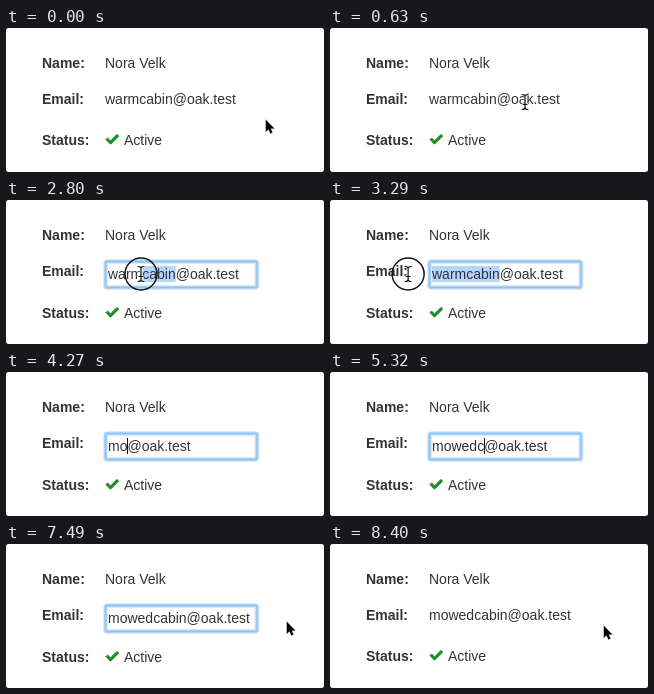
Animation, 318 px wide and 144 px high, one loop 8470 ms. Source, as an HTML page:

```html
<!DOCTYPE html>
<html lang="en">
<head>
<meta charset="utf-8">
<title>Inline edit</title>
<style>
  html, body { margin: 0; width: 100%; height: 100%; overflow: hidden; background: #333; }
  svg { display: block; background: #fff; border-radius: 3px;
        font: 14px "Liberation Sans", Arial, sans-serif; fill: #333; }
  .label { font-weight: bold; }
  .ring { fill: none; }
  .line { fill: none; stroke-linecap: round; }
</style>
</head>
<body>
<svg width="318" height="144" viewBox="0 0 318 144">
  <text class="label" x="36" y="40">Name:</text>
  <text x="99" y="40">Nora Velk</text>
  <text class="label" x="36" y="76">Email:</text>

  <g id="field">
    <rect x="99.5" y="61.5" width="151.5" height="26" rx="1.5" fill="#fff"/>
    <g class="ring">
      <rect x="99.5" y="61.5" width="151.5" height="26" rx="2" stroke="#d8eafc" stroke-width="5"/>
      <rect x="99.5" y="61.5" width="151.5" height="26" rx="1.5" stroke="#a9d2f7" stroke-width="3"/>
      <rect x="99.5" y="61.5" width="151.5" height="26" rx="1" stroke="#92c3ee"/>
    </g>
    <rect id="selection" y="66" height="16" fill="#b4d5fe"/>
  </g>
  <text id="email"></text>
  <rect id="caret" y="66" width="1" height="16" fill="#111"/>

  <g id="status">
    <text class="label" x="36" y="117">Status:</text>
    <path d="M100 111.6 101.6 110 104.5 112.9 111 106.4 112.7 108 104.5 116.2Z"
          fill="#168f1c" stroke="#168f1c" stroke-linejoin="round"/>
    <text x="118" y="117">Active</text>
  </g>

  <g id="pointer">
    <circle id="press" r="16" fill="none" stroke="#111" stroke-width="1.5"/>
    <path id="arrow" d="M0 0V14L3.2 11 5.4 16 7.8 15 5.7 10.2H10Z" transform="translate(.8 .8) scale(.85)"
          fill="#000" stroke="#ddd" stroke-width="1.6" paint-order="stroke"/>
    <g id="beam" class="line">
      <path id="beamShape" stroke="#fff" stroke-width="2.6" stroke-opacity=".8"
            d="M-3-7.5Q0-7.5 0-5.5V5.5Q0 7.5-3 7.5M3-7.5Q0-7.5 0-5.5M3 7.5Q0 7.5 0 5.5M-2 2.5H2"/>
      <path id="beamInk" stroke="#111" stroke-width="1.2"/>
    </g>
  </g>
</svg>
<script>
const $ = id => document.getElementById(id);
const LOOP = 8470, STEP = 70;
const OLD = 'warmcabin', NEW = 'mowedcabin', HOST = '@oak.test';
const keyTimes = [3990, 4270, 4620, 4760, 4830, 5250, 5460, 5530, 5670, 5880];

// time, x, y, and 1 where the move runs at constant speed
const path = [
  [0, 259, 91], [630, 195, 74], [1540, 195, 74], [1820, 168, 74], [2170, 173, 74],
  [2450, 173, 74], [2800, 135, 74, 1], [3360, 70, 74, 1], [3430, 70, 74],
  [3850, 116, 74], [6510, 116, 74], [7420, 280, 77], [8330, 280, 77], [8400, 273, 81]
];

const email = $('email');
$('beamInk').setAttribute('d', $('beamShape').getAttribute('d'));

const show = (id, on) => $(id).setAttribute('visibility', on ? 'visible' : 'hidden');
const within = (t, from, to) => t >= from && t < to;
const widthOf = n => n ? email.getSubStringLength(0, n) : 0;

function pointerAt(t) {
  const i = path.findIndex(k => k[0] > t);
  if (i < 0) return path[path.length - 1].slice(1, 3);
  const [t0, x0, y0] = path[i - 1], [t1, x1, y1, linear] = path[i];
  const u = (t - t0) / (t1 - t0), e = linear ? u : u * u * (3 - 2 * u);
  return [x0 + (x1 - x0) * e, y0 + (y1 - y0) * e];
}

function nearestChar(x) {
  let best = 0;
  for (let n = 1; n <= OLD.length; n++)
    if (Math.abs(102 + widthOf(n) - x) < Math.abs(102 + widthOf(best) - x)) best = n;
  return best;
}

function draw(t) {
  const editing = within(t, 1120, 7980);
  const typed = keyTimes.filter(k => k <= t).length;
  const [x, y] = pointerAt(t);

  email.textContent = (typed ? NEW.slice(0, typed) : OLD) + HOST;
  email.setAttribute('x', editing ? 102 : 99);
  email.setAttribute('y', editing ? 79 : 76);
  $('status').setAttribute('transform', `translate(0 ${editing ? 1 : 0})`);
  $('field').style.display = editing ? '' : 'none';

  const selecting = within(t, 2450, 3990);
  show('selection', selecting);
  if (selecting) {
    const from = t < 3430 ? widthOf(nearestChar(x)) : 0;
    $('selection').setAttribute('x', 102 + from);
    $('selection').setAttribute('width', widthOf(OLD.length) - from);
  }

  show('caret', within(t, 3990, 6440) || within(t, 6930, 7490));
  $('caret').setAttribute('x', Math.round(102 + widthOf(typed)));

  const visible = !within(t, 3990, 6580);
  const overText = x < (editing ? 251 : 233) && y < 84;
  $('pointer').setAttribute('transform', `translate(${x} ${y})`);
  show('arrow', visible && !overText);
  show('beam', visible && overText);
  show('press', within(t, 2240, 3570));
  const fade = Math.min((t - 2170) / 140, (3570 - t) / 140, 1);
  $('press').setAttribute('opacity', Math.max(fade, 0));
}

function tick() {
  const t = performance.now() % LOOP;
  draw(Math.floor(t / STEP) * STEP);
  requestAnimationFrame(tick);
}
tick();
</script>
</body>
</html>
```
